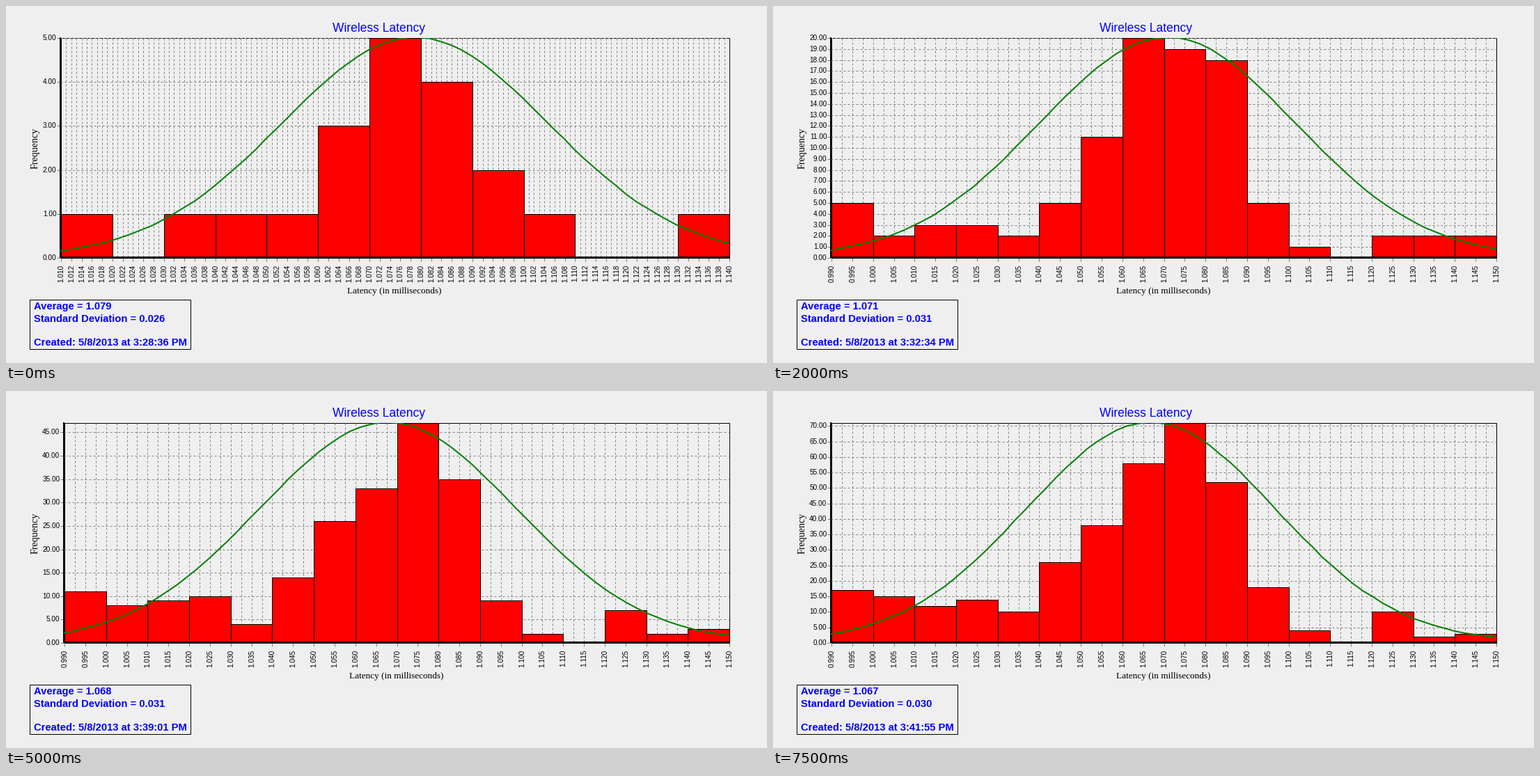
A matplotlib script that plays this animation: 1093 px wide and 513 px high, repeating every 8 s.

```python
import numpy as np
import matplotlib.pyplot as plt
from matplotlib.animation import FuncAnimation
from matplotlib.patches import Rectangle

W, H, DPI = 1093, 513, 64
PX = 72 / DPI                      # points per pixel
TOP, BOTTOM, RIGHT = 45, 361, 1038
FRAMES, STEP_MS = 16, 500
BIN = 0.010
FIRST = 0.990                      # left edge of the first bin

# step: (bin counts, average, deviation, seconds after 3 PM)
KEYS = {
    0: ([0, 0, 1, 0, 1, 1, 1, 3, 5, 4, 2, 1, 0, 0, 1, 0], 1.079, .026, 1716),
    2: ([4, 2, 2, 2, 1, 2, 4, 10, 11, 13, 4, 1, 0, 1, 2, 1], 1.072, .034, 1772),
    4: ([5, 2, 3, 3, 2, 5, 11, 20, 19, 18, 5, 1, 0, 2, 2, 2], 1.071, .031, 1954),
    8: ([8, 5, 8, 9, 4, 10, 21, 28, 38, 30, 6, 1, 0, 7, 2, 3], 1.069, .031, 2263),
    10: ([11, 8, 9, 10, 4, 14, 26, 33, 47, 35, 9, 2, 0, 7, 2, 3], 1.068, .031, 2341),
    13: ([14, 14, 10, 12, 10, 20, 33, 39, 56, 43, 13, 3, 0, 8, 2, 3], 1.066, .032, 2445),
    15: ([17, 15, 12, 14, 10, 26, 38, 58, 71, 52, 18, 4, 0, 10, 2, 3], 1.067, .030, 2515),
}

fig = plt.figure(figsize=(W / DPI, H / DPI), dpi=DPI, facecolor="#f0eff0")
ax = fig.add_axes([0, 0, 1, 1])


def state(step):
    """Counts, average, deviation and clock at a step, blended between keys."""
    lo = max(k for k in KEYS if k <= step)
    hi = min(k for k in KEYS if k >= step)
    u = (step - lo) / max(hi - lo, 1)
    a, b = KEYS[lo], KEYS[hi]
    counts = np.array(a[0]) + (np.array(b[0]) - np.array(a[0])) * u ** 0.82
    rest = [p + (q - p) * u for p, q in zip(a[1:], b[1:])]
    return np.rint(counts).astype(int), *rest


def text(x, y, s, px, color="black", family="Liberation Sans", **kw):
    kw = {"va": "baseline", "rotation_mode": "anchor", **kw}
    ax.text(x, y, s, fontsize=px * PX, color=color, family=family, **kw)


def box(x0, y0, x1, y1, face="none", z=1):
    ax.add_patch(Rectangle((x0 + .5, y0 + .5), x1 - x0, y1 - y0, facecolor=face,
                           edgecolor="black", linewidth=PX, zorder=z))


def hline(y, x0, x1, color, z, width=1, dash="solid"):
    ax.hlines(y, x0, x1, colors=color, linewidth=width * PX, linestyles=dash, zorder=z)


def vline(x, y0, y1, color, z, width=1, dash="solid"):
    ax.vlines(x, y0, y1, colors=color, linewidth=width * PX, linestyles=dash, zorder=z)


def draw(step):
    counts, mean, dev, clock = state(step)
    peak = counts.max()
    left = 78 if peak < 10 else 83
    if step == 0:
        lo, hi, x_step = 1.010, 1.140, 0.002
    else:
        lo, hi, x_step = 0.990, 1.150, 0.005
    y_step = next(s for s in (1, 2, 5, 10) if s * (BOTTOM - TOP) / peak >= 14)

    def to_x(v):
        return np.rint(left + (v - lo) / (hi - lo) * (RIGHT - left))

    def to_y(v):
        return np.rint(BOTTOM - v / peak * (BOTTOM - TOP))

    ax.clear()
    ax.set(xlim=(0, W), ylim=(H, 0))
    ax.axis("off")

    # frame, grid and axes
    dots = (0, (3, 3))
    box(left, TOP, RIGHT, BOTTOM)
    ticks = np.arange(0, peak + 1, y_step)
    rows = to_y(ticks) + .5
    hline(rows[1:], left, RIGHT, "#808080", 2, dash=dots)
    hline(rows, left - 5, left, "#808080", 2)
    n = round((hi - lo) / x_step)
    labels = lo + x_step * np.arange(n + 1)
    halves = lo + x_step / 2 * np.arange(1, 2 * n)
    vline(to_x(halves) + .5, TOP + 1, BOTTOM, "#808080", 2, dash=dots)
    vline(to_x(labels) + .5, BOTTOM, BOTTOM + 6, "#808080", 2)
    vline(left, TOP, BOTTOM + 1, "black", 4, 2)
    hline(BOTTOM, left - 1, RIGHT + 1, "black", 4, 2)
    for v, y in zip(ticks, rows):
        text(left - 5.5, y + 3.6, f"{v:.2f}", 10, ha="right")
    for v in labels:
        text(to_x(v) + 4.2, 372, f"{v:.3f}", 10, ha="right", rotation=90)

    # bars and fitted curve
    for i, c in enumerate(counts):
        start = FIRST + i * BIN
        if lo - 1e-6 < start < hi - 1e-6:
            box(to_x(start), to_y(c), to_x(start + BIN), BOTTOM, "red", 3)
    v = np.linspace(lo, hi, 66)
    bell = peak * np.exp(-((v - mean) / dev) ** 2 / 2)
    curve, = ax.plot(to_x(v), to_y(bell), color="#008000", linewidth=2 * PX, zorder=5)
    curve.set_clip_path(Rectangle((left, TOP + 1), RIGHT + 1 - left, BOTTOM - TOP,
                                  transform=ax.transData))

    # titles
    serif = "Liberation Serif"
    text(535.5, 37, "Wireless Latency", 17.5, "blue", ha="center")
    text((left + RIGHT) / 2, 413, "Latency (in milliseconds)", 13.2, family=serif, ha="center")
    text(46, 204, "Frequency", 14, family=serif, ha="center", rotation=90)

    # summary
    box(33, 421, 264, 492)
    minute, second = divmod(round(clock), 60)
    for y, s in ((436, f"Average = {mean:.3f}"),
                 (454, f"Standard Deviation = {dev:.3f}"),
                 (488, f"Created: 5/8/2013 at 3:{minute:02d}:{second:02d} PM")):
        text(40, y, s, 14.7, "blue", weight="bold")
    return ax.get_children()


anim = FuncAnimation(fig, draw, frames=FRAMES, interval=STEP_MS,
                     init_func=lambda: [], repeat=True, repeat_delay=0)
plt.show()
```
